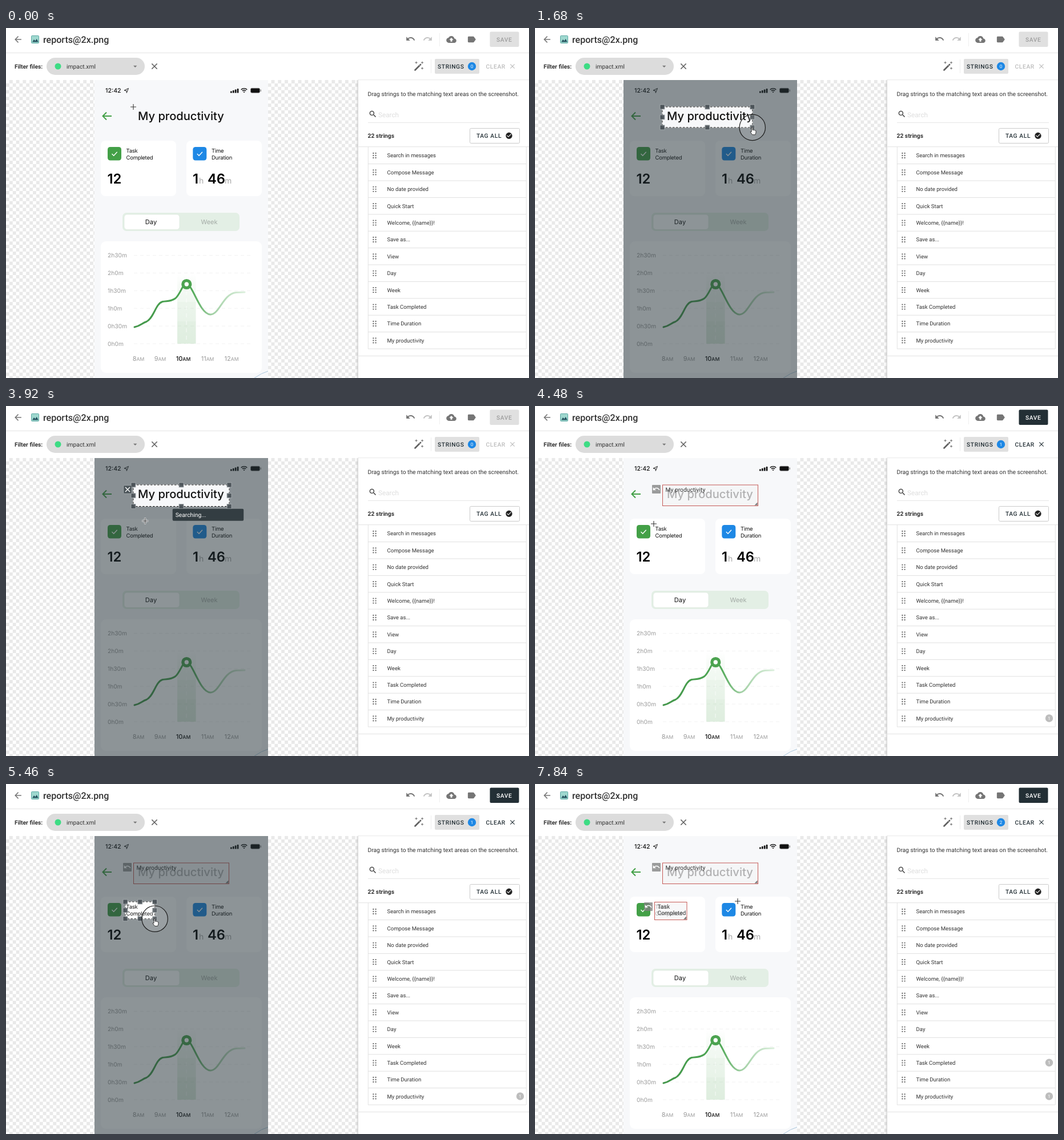
Animation of 916 by 612 pixels, one loop 8000 ms. Source, as an HTML page:

```html
<!DOCTYPE html>
<html lang="en">
<head>
<meta charset="utf-8">
<title>Screenshot tagging</title>
<style>
html, body { margin: 0; width: 100%; height: 100%; overflow: hidden; background: #fff; }
svg { display: block; width: 916px; height: 612px; }
text { font-family: Roboto, sans-serif; font-size: 10.29px; fill: #333; text-rendering: geometricPrecision; white-space: pre; }
.ui { font-family: Inter, sans-serif; }
.caps { font-weight: 500; letter-spacing: .6px; }
</style>
</head>
<body>
<svg id="stage" viewBox="0 0 916 612" xmlns="http://www.w3.org/2000/svg"></svg>
<script>
const LOOP = 8000, STEP = 70;

const icons = {
  back: 'M20 11H7.83l5.59-5.59L12 4l-8 8 8 8 1.41-1.41L7.83 13H20v-2z',
  undo: 'M12.5 8c-2.65 0-5.05.99-6.9 2.6L2 7v9h9l-3.62-3.62c1.39-1.16 3.16-1.88 5.12-1.88 3.54 0 6.55 2.31 7.6 5.5l2.37-.78C21.08 11.03 17.15 8 12.5 8z',
  cloud: 'M19.35 10.04C18.67 6.59 15.64 4 12 4 9.11 4 6.6 5.64 5.35 8.04 2.34 8.36 0 10.91 0 14c0 3.31 2.69 6 6 6h13c2.76 0 5-2.24 5-5 0-2.64-2.05-4.78-4.65-4.96zM14 13v4h-4v-4H7l5-5 5 5h-3z',
  label: 'M17.63 5.84C17.27 5.33 16.67 5 16 5H5c-1.1 0-2 .9-2 2v10c0 1.1.9 2 2 2h11c.67 0 1.27-.33 1.63-.84L22 12z',
  search: 'M15.5 14h-.79l-.28-.27C15.41 12.59 16 11.11 16 9.5 16 5.91 13.09 3 9.5 3S3 5.91 3 9.5 5.91 16 9.5 16c1.61 0 3.09-.59 4.23-1.57l.27.28v.79l5 4.99L20.49 19zm-6 0C7.01 14 5 11.99 5 9.5S7.01 5 9.5 5 14 7.01 14 9.5 11.99 14 9.5 14z',
  close: 'M19 6.41L17.59 5 12 10.59 6.41 5 5 6.41 10.59 12 5 17.59 6.41 19 12 13.41 17.59 19 19 17.59 13.41 12z',
  done: 'M12 2C6.48 2 2 6.48 2 12s4.48 10 10 10 10-4.48 10-10S17.52 2 12 2zm-2 15l-5-5 1.41-1.41L10 14.17l7.59-7.59L19 8z',
  wifi: 'M1 9l2 2c4.97-4.97 13.03-4.97 18 0l2-2C16.93 2.93 7.08 2.93 1 9zm8 8l3 3 3-3c-1.65-1.66-4.34-1.66-6 0zm-4-4l2 2c2.76-2.76 7.24-2.76 10 0l2-2C15.14 9.14 8.87 9.14 5 13z'
};

// Markup helpers
const rect = (x, y, w, h, fill, r = 0, more = '') =>
  `<rect x="${x}" y="${y}" width="${w}" height="${h}" rx="${r}" fill="${fill}" ${more}/>`;
const circle = (x, y, r, fill, more = '') => `<circle cx="${x}" cy="${y}" r="${r}" fill="${fill}" ${more}/>`;
const line = (d, color, w = 1, more = '') => `<path d="${d}" fill="none" stroke="${color}" stroke-width="${w}" ${more}/>`;
const text = (x, y, str, style = '', more = '') => `<text x="${x}" y="${y}" style="${style}" ${more}>${str}</text>`;
const ui = (x, y, str, size, fill = '#111', style = '', more = '') =>
  text(x, y, str, `font-size:${size}px;fill:${fill};${style}`, `class="ui" ${more}`);
const caps = (x, y, str, fill, id = '') => text(x, y, str, `fill:${fill}`, `class="caps" id="${id}"`);
const icon = (name, x, y, fill, size = 17.64, flip = 1, id = '') =>
  `<path d="${icons[name]}" id="${id}" fill="${fill}" transform="translate(${x} ${y}) scale(${size / 24 * flip} ${size / 24}) translate(-12 -12)"/>`;
const mid = 'text-anchor="middle"';

function header() {
  return rect(0, 0, 916, 91, '#fff') + line('M0 43.5H916', '#e4e4e4') +
    icon('back', 21, 20, '#757575') +
    rect(44.5, 13.5, 13, 13, '#9fd8cf', 1, 'stroke="#5ba9a4"') +
    '<path d="M46 24.5l3-4.5 2.3 2.6 2.4-3.6 3 5.5z" fill="#24535f"/>' +
    text(65, 26, 'reports@2x.png', 'font-size:16.1px;font-weight:500') +
    icon('undo', 708.5, 19, '#757575') + icon('undo', 738.5, 19, '#c4c4c4', 17.64, -1) +
    line('M759.5 9V32M744.5 55V79', '#eee') +
    icon('cloud', 780, 20, '#757575') + icon('label', 815.5, 20, '#757575') +
    rect(847.5, 6.6, 51, 26.4, '#e0e0e0', 2, 'id="saveBox"') + caps(859, 23.6, 'SAVE', '#9e9e9e', 'save') +
    text(15, 70.6, 'Filter files:', 'font-weight:700') +
    rect(71, 52, 172, 30, '#dcdcdc', 15) + circle(91, 67, 5.5, '#3ddc84') +
    text(106, 70.6, 'impact.xml') + '<path d="M223 65.7h6.4l-3.2 3.2z" fill="#777"/>' +
    icon('close', 260, 67, '#616161') +
    line('M716.5 73.5L726 64', '#616161', 2.8, 'stroke-linecap="round"') +
    line('M723.4 64.2l2.4 2.4', '#fff', .8) +
    line('M718.5 58.5v4M716.5 60.5h4M729 58.5v4M727 60.5h4M729 68.5v4M727 70.5h4', '#757575', 1.2) +
    rect(751, 54, 78, 26, '#e0e0e0', 2) + caps(756, 70.6, 'STRINGS', '#263238') +
    circle(816, 67, 7.2, '#1e88e5') +
    text(816, 69.9, '0', 'font-size:8px;fill:#fff', mid + ' id="count"') +
    caps(840.5, 70.6, 'CLEAR', '#bdbdbd', 'clear') + icon('close', 887, 67, '#bdbdbd', 14, 1, 'clearX');
}

const checkBox = (x, fill) => rect(x, 208, 24, 23.5, fill, 4.5) +
  line(`M${x + 7.5} 220l3.2 3.2 6-6.4`, '#fff', 1.4);

function chart() {
  let out = rect(166, 373, 282, 230, '#fff', 9);
  ['2h30m', '2h0m', '1h30m', '1h0m', '0h30m', '0h0m'].forEach((s, i) => {
    const y = 397.5 + i * 30.9;
    out += ui(178, y + 3.6, s, 10.2, '#9b9b9b') + line(`M224 ${y}H428`, '#f2f2f2', 1, 'stroke-dasharray="6 5"');
  });
  out += rect(300, 430, 32.5, 122, 'url(#bar)') + rect(300, 479, 32.5, 73, '#43a047', 0, 'opacity=".03"') +
    rect(300, 513, 32.5, 39, '#43a047', 0, 'opacity=".03"') +
    line('M316 460V552', '#fff', 1, 'stroke-dasharray="7 6" opacity=".7"') +
    line('M225 523C236 521 238 516 246 513.5C259 507 262 482 274 478.5C283 477 289 478.5 297 472.5C306 464 309 448 316 447C328 450 339 500 358 501C374 501 380 465 403 462.5L418 462',
      'url(#curve)', 3, 'stroke-linecap="round"') +
    circle(316.3, 448, 6.4, '#fff', 'stroke="#4ca350" stroke-width="5.4"');
  [['8', 232], ['9', 270], ['10', 310.5], ['11', 353], ['12', 395]].forEach(([h, x]) => {
    const on = h === '10';
    out += ui(x, 581.7, `${h}<tspan font-size="8.6">AM</tspan>`, 11, on ? '#111' : '#9b9b9b',
      on ? 'font-weight:500' : '', mid);
  });
  return out;
}

function phone() {
  const small = 'letter-spacing:-.25px';
  const big = 'font-weight:600';
  return rect(0, 91, 616, 521, 'url(#checker)') + rect(155, 91, 304, 521, '#f7f8fa') +
    ui(174, 113, '12:42', 10.6, '#111', 'font-weight:500') +
    line('M214.5 105.5l-7.5 3.6 3.8.5.5 3.8z', '#222', 1) +
    [0, 1, 2, 3].map(i => rect(393 + i * 3.9, 110.6 - i * 1.5, 2.7, 2.9 + i * 1.5, '#111', .6)).join('') +
    icon('wifi', 417, 109, '#111', 12.5) +
    rect(428.5, 105.3, 16, 8, '#111', 2, 'stroke="#777" stroke-width=".8"') + rect(445.6, 107.5, 1.2, 3.6, '#777') +
    line('M185 154H169.5M176 147.5L169.5 154L176 160.5', '#43a047', 2) +
    ui(231, 161, 'My productivity', 20.1, '#111', 'font-weight:500') +
    rect(166, 197, 132, 97, '#fff', 8) + rect(316, 197, 132, 97, '#fff', 8) +
    checkBox(178, '#43a047') + checkBox(327.3, '#1e88e5') +
    ui(210.5, 217.8, 'Task', 9.5, '#111', small) + ui(210.5, 229.8, 'Completed', 9.5, '#111', small) +
    ui(360, 217.8, 'Time', 9.5, '#111', small) + ui(360, 230.2, 'Duration', 9.5, '#111', small) +
    ui(177.5, 272, '12', 23.8, '#000', big) + ui(327, 272, '1', 23.8, '#000', big) +
    ui(338, 272, 'h', 14, '#aaa') + ui(353, 272, '46', 23.8, '#000', big) + ui(383, 272, 'm', 14, '#aaa') +
    rect(204, 323, 205, 32, '#e3efe5', 7) + rect(207, 326, 97, 26.5, '#fff', 5, 'stroke="#d9e6db" stroke-width=".6"') +
    ui(254, 343, 'Day', 11.1, '#111', '', mid) + ui(356, 343, 'Week', 11, '#a3aaa5', '', mid) +
    chart() + line('M435 612Q448 603 459 600', '#a9c6dc');
}

function panel() {
  let out = rect(612, 91, 4, 521, 'url(#shade)') + rect(616, 91, 300, 521, '#fff') +
    line('M616.3 91V612', '#cfcfcf') + line('M616 90.7H916', '#e8e8e8') +
    text(633.5, 118.8, 'Drag strings to the matching text areas on the screenshot.') +
    icon('search', 642.5, 150.5, '#333', 15.5) + text(652, 156, 'Search', 'font-size:11.76px;fill:#dedede') +
    line('M634 165.5H900', '#e6e6e6') + text(633.5, 192, '22 strings', 'font-weight:700') +
    rect(812.5, 175.5, 87, 26, '#fff', 2, 'stroke="#cacaca"') +
    caps(824, 192, 'TAG ALL', '#263238') + icon('done', 881, 188.3, '#222', 13.5) +
    line('M616 207.7H916M616 573.4H916', '#e2e2e2') + line('M634.3 208V561M911.3 208V561', '#e2e2e2');
  ['Search in messages', 'Compose Message', 'No date provided', 'Quick Start', 'Welcome, {{name}}!', 'Save as...',
    'View', 'Day', 'Week', 'Task Completed', 'Time Duration', 'My productivity'].forEach((s, i) => {
    const y = 223 + i * 29.4;
    out += text(667.5, y + 3.4, s, 'font-size:9.56px') + line(`M634 ${y + 14.6}H911`, '#e0e0e0');
    for (let k = 0; k < 6; k++) out += circle(643.4 + k % 2 * 4.2, y - 4 + (k >> 1) * 4, 1.15, '#666');
  });
  const badge = (id, y) => `<g id="${id}">${circle(900.5, y, 6.7, '#bdbdbd')}${text(900.5, y + 2.9, '1', 'font-size:8px;fill:#fff', mid)}</g>`;
  return out + badge('badge1', 546) + badge('badge2', 487.3);
}

function tag(id, x, y, w, h, words, lead, undoX, undoY) {
  return `<g id="${id}">` + rect(x, y, w, h, 'rgba(245,246,247,.7)', 0, 'stroke="#c65a56"') +
    words.map((s, i) => text(x + 5, y + lead + i * 11, s)).join('') +
    `<path d="M${x + w - 1} ${y + h - 6}v5h-5z" fill="#777"/>` +
    rect(undoX, undoY, 15, 15, 'rgba(130,130,130,.78)', 1) + icon('undo', undoX + 7.5, undoY + 7, '#fff', 14) + '</g>';
}

const stage = document.getElementById('stage');
stage.innerHTML = `<defs>
  <pattern id="checker" y="91" width="11.76" height="11.76" patternUnits="userSpaceOnUse">
    <path d="M0 0h11.76v11.76H0z" fill="#e9e9e9"/><path d="M0 0h5.88v11.76h5.88V5.88H0z" fill="#fff"/></pattern>
  <linearGradient id="curve" gradientUnits="userSpaceOnUse" x1="225" x2="418">
    <stop stop-color="#43964a"/><stop offset=".52" stop-color="#4fa855"/><stop offset=".7" stop-color="#a0cfa3"/>
    <stop offset="1" stop-color="#dcefdd"/></linearGradient>
  <linearGradient id="bar" x2="0" y2="1"><stop stop-color="#43a047" stop-opacity="0"/>
    <stop offset=".3" stop-color="#43a047" stop-opacity=".07"/><stop offset="1" stop-color="#43a047" stop-opacity=".12"/></linearGradient>
  <linearGradient id="shade"><stop stop-color="#000" stop-opacity="0"/><stop offset="1" stop-color="#000" stop-opacity=".1"/></linearGradient>
  </defs>` + phone() +
  tag('tag1', 223.5, 138, 167, 36.5, ['My productivity'], 11.6, 205, 138) +
  tag('tag2', 209.5, 206.5, 56.5, 31, ['Task', 'Completed'], 11, 191, 207) +
  '<g id="crop"><path id="dim" fill="rgba(38,50,56,.52)" fill-rule="evenodd"/>' +
  '<rect id="edge" fill="none" stroke="#fff"/><rect id="dash" fill="none" stroke="#222" stroke-dasharray="3.5 2.5"/><g id="grips">' +
  rect(-4, -4, 8, 8, 'rgba(70,78,84,.9)', 0, 'stroke="#aab0b3" stroke-width=".8"').repeat(8) + '</g></g>' +
  '<g id="cancel">' + rect(0, 0, 14, 14, 'rgba(50,60,65,.7)', 1, 'stroke="rgba(255,255,255,.4)" stroke-width=".6"') +
  line('M3 3l8 8M11 3l-8 8', '#fff', 1.4) + '</g>' +
  '<g id="tip">' + rect(0, 0, 124.5, 21, 'rgba(38,48,53,.86)', 2) + text(5, 14, 'Searching...', 'fill:#fff') + '</g>' +
  header() + panel() + '<g id="pointer">' +
  circle(0, 0, 22.7, 'rgba(255,255,255,.1)', 'id="ring" stroke="#1c1c1c" stroke-width="1.2"') +
  '<path id="hand" d="M-1.6 0q1.2-.8 2 .4v4l1.2.2q.8-.7 1.6.2 1-.5 1.6.4 1.2-.2 1.4 1v3l-1.2 3.6h-5l-3.6-4.8q.2-1.4 1.6-.6l.4.4z" fill="#fff" stroke="#222" stroke-width=".9"/>' +
  '<path id="arrow" d="M0 0v11.4l2.7-2.5 1.9 4.2 1.9-.8-1.9-4.1h3.6z" fill="#222" stroke="#fff" stroke-width=".9"/>' +
  '<g id="plus">' + line('M-5.5 0h11M0-5.5v11', '#fff', 3, 'opacity=".85"') + line('M-5 0h10M0-5v10', '#333', 1.1) + '</g></g>';

const el = {};
stage.querySelectorAll('[id]').forEach(n => el[n.id] = n);
const show = (n, on) => n.setAttribute('visibility', on ? 'visible' : 'hidden');
const move = (n, x, y) => n.setAttribute('transform', `translate(${x} ${y})`);
const set = (n, attrs) => { for (const k in attrs) n.setAttribute(k, attrs[k]); };
const clamp = v => Math.min(1, Math.max(0, v));
const smooth = v => v * v * (3 - 2 * v);

const rounds = [
  { press: 210, stop: 1940, lift: 2200, search: 2310, done: 3990, from: [223, 138], to: [391, 175.5], x: [206, 139], tip: [291.7, 179.7] },
  { press: 4690, stop: 5650, lift: 5770, search: 5880, done: 7560, from: [209, 206], to: [266.5, 238], x: [192, 207], tip: [263.7, 242.2] }
];

// Free pointer travel: time, x, y
const travel = [[0, 223, 138], [210, 223, 138], [2200, 391, 175.5], [2310, 391, 175.5], [2800, 345.5, 187], [4480, 208, 206],
  [4690, 208, 206], [5770, 266.5, 238], [5880, 266.5, 238], [6720, 342, 228], [7490, 360, 209], [7840, 355, 205]];

function pointerAt(t) {
  let i = travel.length - 1;
  while (travel[i][0] > t) i--;
  const a = travel[i], b = travel[i + 1] || a;
  const p = b === a ? 0 : smooth((t - a[0]) / (b[0] - a[0]));
  return [a[1] + (b[1] - a[1]) * p, a[2] + (b[2] - a[2]) * p];
}

function drawCrop([x, y], [x2, y2]) {
  const w = Math.max(1, x2 - x), h = Math.max(1, y2 - y);
  set(el.dim, { d: `M155 91h304v521h-304zM${x} ${y}h${w}v${h}h${-w}z` });
  set(el.edge, { x, y, width: w, height: h });
  set(el.dash, { x, y, width: w, height: h });
  [0, 1, 2, 3, 5, 6, 7, 8].forEach((k, i) => move(el.grips.children[i], x + w * (k % 3) / 2, y + h * Math.floor(k / 3) / 2));
}

function render(t) {
  const r = rounds.find(q => t >= q.press && t < q.done);
  const drag = r && t < r.lift;
  const found = r && t >= r.search;
  const tags = rounds.filter(q => t >= q.done).length;
  let at = pointerAt(t);

  show(el.crop, r);
  show(el.cancel, found);
  show(el.tip, found);
  if (r) {
    const p = smooth(clamp((t - r.press) / (r.stop - r.press)));
    const end = [r.from[0] + (r.to[0] - r.from[0]) * p, r.from[1] + (r.to[1] - r.from[1]) * Math.pow(p, .7)];
    drawCrop(r.from, end);
    if (drag) {
      at = end;
      el.ring.setAttribute('opacity', clamp((r.lift - t) / 150));
    }
    move(el.cancel, ...r.x);
    move(el.tip, ...r.tip);
  }

  const over = found && at[0] > r.tip[0] && at[0] < r.tip[0] + 124 && at[1] > r.tip[1] && at[1] < r.tip[1] + 21;
  move(el.pointer, ...at);
  show(el.ring, drag);
  show(el.hand, drag);
  show(el.arrow, over);
  show(el.plus, !drag && !over);

  const on = tags > 0;
  [el.tag1, el.badge1].forEach(n => show(n, on));
  [el.tag2, el.badge2].forEach(n => show(n, tags > 1));
  el.count.textContent = tags;
  set(el.saveBox, { fill: on ? '#232f35' : '#e0e0e0' });
  el.save.style.fill = on ? '#fff' : '#9e9e9e';
  el.clear.style.fill = on ? '#263238' : '#bdbdbd';
  set(el.clearX, { fill: on ? '#263238' : '#bdbdbd' });
}

const start = performance.now();
function tick() {
  const t = (performance.now() - start) % LOOP;
  render(Math.floor(t / STEP) * STEP);
  requestAnimationFrame(tick);
}
tick();
</script>
</body>
</html>
```
